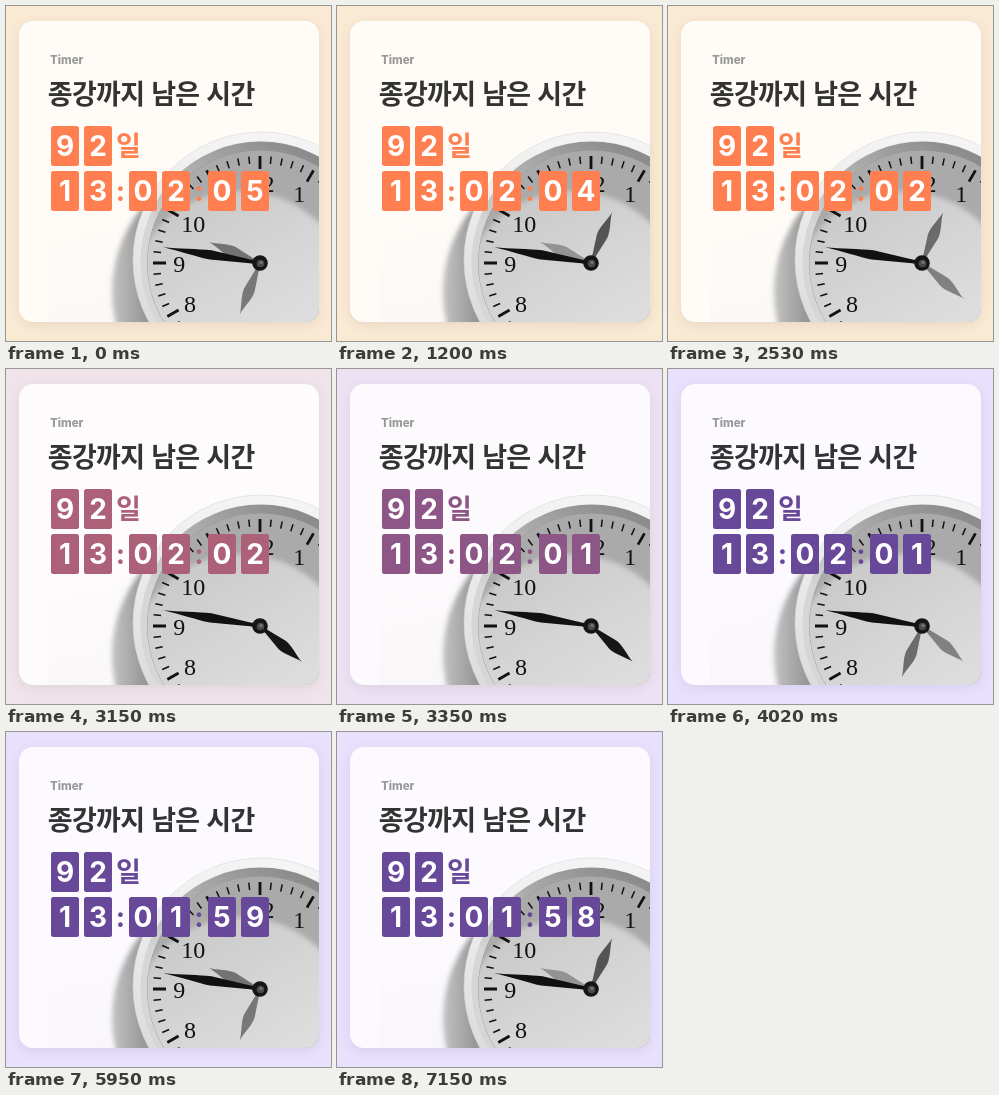
Animation of 325x335 px, one loop 7210 ms. Source, as an HTML page:

```html
<!DOCTYPE html>
<html lang="ko">
<head>
<meta charset="utf-8">
<title>Timer</title>
<style>
  html, body { margin: 0; width: 100%; height: 100%; overflow: hidden; }
  svg { display: block; width: 325px; height: 335px; }
  .ko { font: 700 27px "Noto Sans CJK KR", "Noto Sans CJK", sans-serif; }
  .label { font: 800 11.5px Inter, sans-serif; fill: #999; }
  .digit { font: 700 28px Inter, sans-serif; text-anchor: middle; }
  .numeral { font: 24px "Liberation Serif", serif; text-anchor: middle; fill: #111; }
</style>
</head>
<body>
<svg viewBox="0 0 325 335" xmlns="http://www.w3.org/2000/svg">
  <defs>
    <clipPath id="cardClip"><rect x="13" y="15" width="300" height="301" rx="14"/></clipPath>
    <clipPath id="dialClip"><circle cx="254" cy="257" r="113"/></clipPath>
    <filter id="soft" x="-20%" y="-20%" width="140%" height="140%"><feGaussianBlur stdDeviation="6"/></filter>
    <filter id="blur" x="-20%" y="-20%" width="140%" height="140%"><feGaussianBlur stdDeviation="2.5"/></filter>
    <linearGradient id="wall" x1="0" y1="0" x2="0.3" y2="1">
      <stop offset="0.4" stop-color="#e4e2e2" stop-opacity="0"/>
      <stop offset="1" stop-color="#e4e2e2" stop-opacity="0.15"/>
    </linearGradient>
    <linearGradient id="shade" x1="0" y1="0" x2="1" y2="0">
      <stop offset="0" stop-color="#c2c2c2"/>
      <stop offset="0.12" stop-color="#979797"/>
    </linearGradient>
    <linearGradient id="rim" x1="0.3" y1="0" x2="0.2" y2="1">
      <stop offset="0" stop-color="#f4f4f4"/>
      <stop offset="0.4" stop-color="#e8e8e8"/>
      <stop offset="1" stop-color="#d4d4d4"/>
    </linearGradient>
    <linearGradient id="bevel" x1="0.6" y1="0" x2="0.3" y2="0.5">
      <stop offset="0" stop-color="#8c8c8c"/>
      <stop offset="0.5" stop-color="#adadad"/>
      <stop offset="1" stop-color="#d6d6d6"/>
    </linearGradient>
    <linearGradient id="dial" x1="0.2" y1="0.1" x2="0.6" y2="0.8">
      <stop offset="0" stop-color="#cacaca"/>
      <stop offset="0.5" stop-color="#d6d6d6"/>
      <stop offset="1" stop-color="#e0e0e0"/>
    </linearGradient>
  </defs>
  <rect id="page" width="325" height="335"/>
  <rect x="13" y="18" width="300" height="301" rx="14" fill="#503c50" opacity="0.1" filter="url(#soft)"/>
  <rect id="card" x="13" y="15" width="300" height="301" rx="14"/>
  <g clip-path="url(#cardClip)">
    <rect x="42" y="120" width="271" height="196" fill="url(#wall)"/>
    <circle cx="241" cy="286" r="135" fill="url(#shade)" filter="url(#blur)"/>
    <circle cx="255" cy="254" r="128" fill="url(#rim)" stroke="#d8d8d8" stroke-width="0.6"/>
    <circle cx="254.5" cy="255.5" r="120" fill="url(#bevel)"/>
    <g clip-path="url(#dialClip)">
      <circle cx="254" cy="257" r="113" fill="#aaa"/>
      <circle cx="235" cy="297" r="112" fill="url(#dial)" filter="url(#blur)"/>
      <circle cx="254" cy="257" r="113" fill="none" stroke="#8a8a8a" opacity="0.6"/>
    </g>
    <g id="clock" transform="translate(254 257)"></g>
  </g>
  <text class="label" x="44" y="58">Timer</text>
  <text class="ko" x="41.8" y="98" fill="#333" letter-spacing="-0.7">종강까지 남은 시간</text>
  <g id="accent"><text class="ko" x="110" y="150">일</text></g>
  <g id="digits" fill="#fff"></g>
</svg>
<script>
const LOOP = 7210, FIRST_TICK = 280, FADE = 400;
const START = 13 * 3600 + 2 * 60 + 5;
const THEME = {
  page: [[250, 233, 211], [232, 224, 253]],
  card: [[255, 252, 248], [252, 250, 255]],
  accent: [[255, 127, 80], [104, 72, 152]]
};
const UP = 22.5, RIGHT = 130.5, DOWN = 201.5, LEFT = 292.5;
// short hand poses: [start of dissolve, angle]
const POSES = [
  [-1600, DOWN], [-200, LEFT], [935, UP], [2350, RIGHT], [3800, DOWN], [5750, LEFT], [6885, UP]
];

const $ = id => document.getElementById(id);
const clamp = v => Math.max(0, Math.min(1, v));

function add(parent, tag, attrs, text) {
  const el = document.createElementNS('http://www.w3.org/2000/svg', tag);
  for (const k in attrs) el.setAttribute(k, attrs[k]);
  if (text) el.textContent = text;
  return parent.appendChild(el);
}

function buildClock() {
  const clock = $('clock');
  for (let i = 0; i < 60; i++) {
    const major = i % 5 === 0;
    add(clock, 'line', {
      y1: -107, y2: major ? -94 : -99.5, stroke: '#111',
      'stroke-width': major ? 2.8 : 1.5, transform: `rotate(${i * 6})`
    });
  }
  for (let h = 1; h <= 12; h++) {
    const a = h * Math.PI / 6, shift = h > 9 ? 2.5 : -0.7;
    add(clock, 'text', { class: 'numeral', x: shift + 80 * Math.sin(a), y: 8.5 - 80 * Math.cos(a) }, String(h));
  }
  const hands = POSES.map(([, angle]) => add(clock, 'path', {
    d: 'M0-55C1-47 6-37 5.5-29L2-9V0H-2V-9L-5.5-29C-6-37-1-47 0-55Z',
    fill: '#161616', transform: `rotate(${angle})`
  }));
  add(clock, 'path', {
    d: 'M0-98C1-82 4-64 4.7-50L2-10V0H-2V-10L-4.7-50C-4-64-1-82 0-98Z',
    fill: '#111', transform: 'rotate(-80.7)'
  });
  add(clock, 'circle', { r: 7.8, fill: '#151515' });
  add(clock, 'circle', { cx: 0.5, cy: 0.5, r: 3.8, fill: '#4a4a4a' });
  add(clock, 'circle', { cx: 1, cy: -0.5, r: 1.6, fill: '#777' });
  return hands;
}

function tile(x, y) {
  add($('accent'), 'rect', { x, y, width: 28, height: 40, rx: 2.5 });
  return add($('digits'), 'text', { class: 'digit', x: x + 14, y: y + 30 });
}

const hands = buildClock();
const days = [45, 78].map(x => tile(x, 120));
const clockDigits = [45, 78, 123, 156, 202, 235].map(x => tile(x, 165));
[114.5, 193].forEach(x => add($('accent'), 'text', { class: 'digit', x, y: 195 }, ':'));

const show = (cells, str) => cells.forEach((c, i) => { c.textContent = str[i]; });
const two = n => String(n).padStart(2, '0');
show(days, '92');

function draw(t) {
  const k = clamp((t - 2600) / 1000);
  for (const id in THEME) {
    const [from, to] = THEME[id];
    $(id).setAttribute('fill', `rgb(${from.map((v, i) => Math.round(v + (to[i] - v) * k))})`);
  }
  const s = START - Math.floor((t - FIRST_TICK) / 1000) - 1;
  show(clockDigits, two(Math.floor(s / 3600)) + two(Math.floor(s / 60) % 60) + two(s % 60));

  const phase = i => i < POSES.length ? clamp((t - POSES[i][0]) / FADE) : 0;
  hands.forEach((hand, i) => hand.setAttribute('opacity', phase(i) - phase(i + 1)));
}

const begin = performance.now();
function frame() {
  draw((performance.now() - begin) % LOOP);
  requestAnimationFrame(frame);
}
frame();
</script>
</body>
</html>
```
